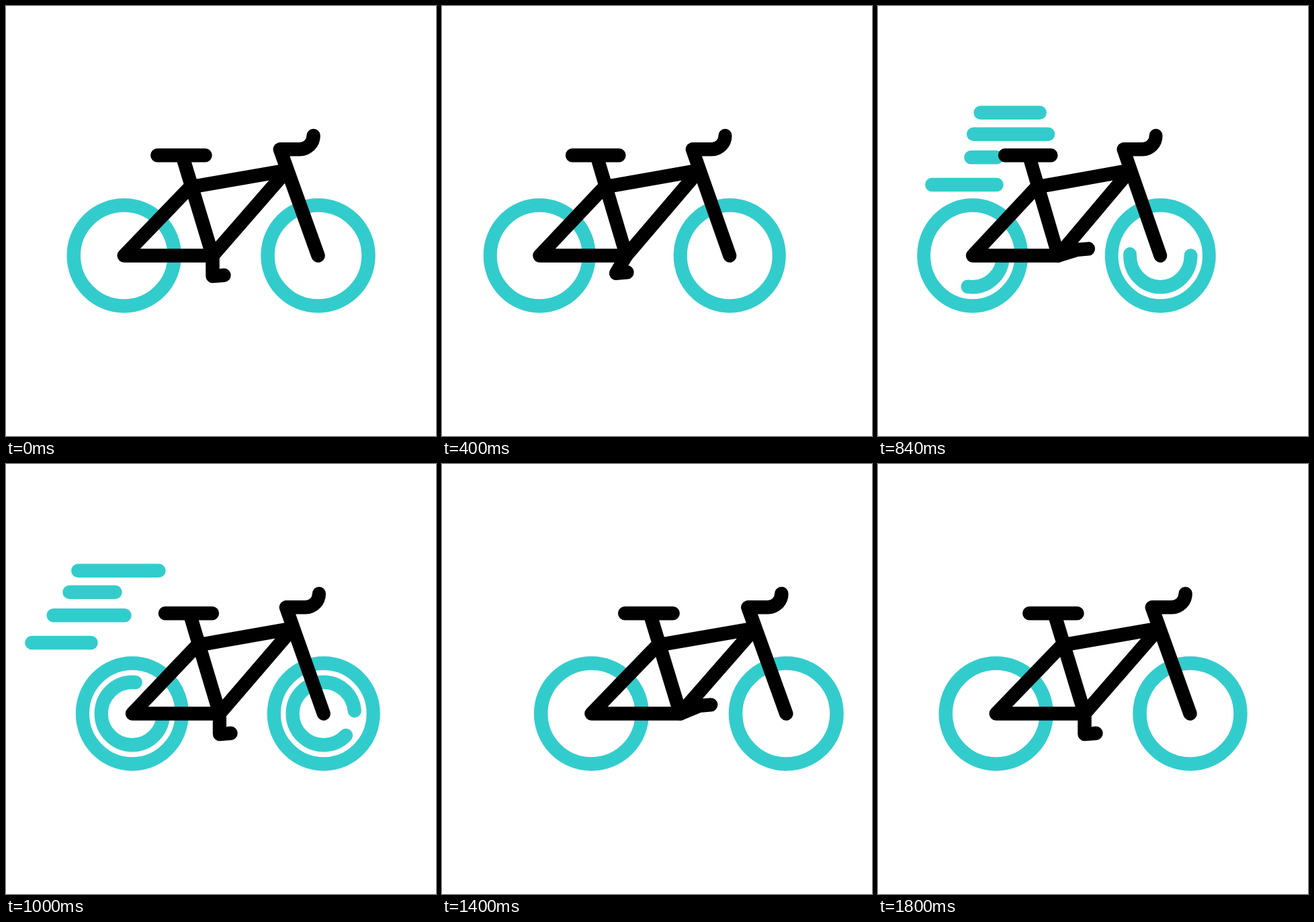
An HTML page for the animation above (2000 ms loop, 640 by 640 pixels).

```html
<!DOCTYPE html>
<html lang="en">
<head>
<meta charset="utf-8">
<title>Bicycle</title>
<style>
  html, body { margin: 0; width: 100%; height: 100%; overflow: hidden; background: #fff; }
  svg { display: block; width: 100vw; height: 100vh; }
  g { fill: none; stroke-width: 20.5; stroke-linecap: round; stroke-linejoin: round; }
  .teal { stroke: #33cccc; }
  .black { stroke: #000; }
</style>
</head>
<body>
<svg viewBox="0 0 640 640">
  <g id="wind" class="teal"></g>
  <g id="bike">
    <g class="teal">
      <circle cx="175.7" cy="371.5" r="75"/>
      <circle cx="464.5" cy="371.5" r="75"/>
      <circle id="rear" cx="175.7" cy="371.5" r="46.8" pathLength="360"/>
      <circle id="front" cx="464.5" cy="371.5" r="46.8" pathLength="360"/>
    </g>
    <g class="black">
      <path d="M225.3 222.3H296.5M262.3 222.3L307.5 371.5H175.7L276 267.5M275.5 269.3L418 244.7L307.5 371.5"/>
      <path d="M464.5 371.5L407.8 213.3H437.3A20.3 20.3 0 0 0 457.6 193"/>
      <path id="crank"/>
    </g>
  </g>
</svg>
<script>
const LOOP = 2000, STEP = 40, MID = 320.1;
const $ = id => document.getElementById(id);
const clamp = u => Math.min(1, Math.max(0, u));
const span = (t, [a, b]) => clamp((t - a) / (b - a));
const smooth = u => u * u * (3 - 2 * u);

// cubic-bezier easing, solved by bisection
function bezier(x1, y1, x2, y2) {
  const at = (s, p, q) => 3 * (1 - s) ** 2 * s * p + 3 * (1 - s) * s * s * q + s ** 3;
  return u => {
    let lo = 0, hi = 1;
    for (let i = 0; i < 24; i++) {
      const s = (lo + hi) / 2;
      if (at(s, x1, x2) < u) lo = s; else hi = s;
    }
    return at((lo + hi) / 2, y1, y2);
  };
}

// time, centre x, horizontal scale, easing towards the next key
const ride = [
  [200, MID, 1, bezier(.167, .167, .833, 1)],
  [720, 243.1, .954, bezier(.167, .167, .75, 1)],
  [1240, 379, 1.0045, smooth],
  [1800, MID, 1]
];

// right end, left end, y, head times, tail times
const lines = [
  [240.7, 107.3, 158.7, [675, 925], [975, 1225]],
  [321, 94.5, 190.8, [540, 920], [720, 1120]],
  [176.5, 38.4, 225.3, [750, 1076], [1000, 1293]],
  [176.5, 38.4, 266, [638, 928], [895, 1185]]
].map(([right, left, y, head, tail]) => {
  const el = document.createElementNS("http://www.w3.org/2000/svg", "path");
  $("wind").append(el);
  return { el, right, left, y, head, tail };
});

const spins = [
  { el: $("front"), head: [670, 1005], tail: [968, 1230] },
  { el: $("rear"), head: [750, 1076], tail: [1000, 1293] }
];

function trim(part, t) {
  const head = span(t, part.head), tail = span(t, part.tail);
  part.el.style.display = head > tail ? "" : "none";
  return [head, tail];
}

function draw(t) {
  let i = 0;
  while (i < ride.length - 2 && t >= ride[i + 1][0]) i++;
  const [t0, x0, s0, ease] = ride[i], [t1, x1, s1] = ride[i + 1];
  const k = ease(span(t, [t0, t1]));
  const x = x0 + (x1 - x0) * k, s = s0 + (s1 - s0) * k;
  $("bike").setAttribute("transform", `translate(${x} 0) scale(${s} 1) translate(${-MID} 0)`);

  // two turns of the crank; the pedal stays level
  const a = smooth(span(t, [200, 1800])) * 4 * Math.PI;
  $("crank").setAttribute("d",
    `M307.5 371.5l${-30.6 * Math.sin(a)} ${30.6 * Math.cos(a)}l17 -1.4`);

  for (const line of lines) {
    const [from, to] = trim(line, t).map(u => line.right + (line.left - line.right) * u);
    line.el.setAttribute("d", `M${from} ${line.y}H${to}`);
  }
  for (const spin of spins) {
    const [head, tail] = trim(spin, t);
    spin.el.setAttribute("stroke-dasharray", `${(head - tail) * 360} 999`);
    spin.el.setAttribute("stroke-dashoffset", -tail * 360);
  }
}

const start = performance.now();
function tick() {
  const t = (performance.now() - start) % LOOP;
  draw(Math.floor(t / STEP) * STEP);
  requestAnimationFrame(tick);
}
tick();
</script>
</body>
</html>
```
